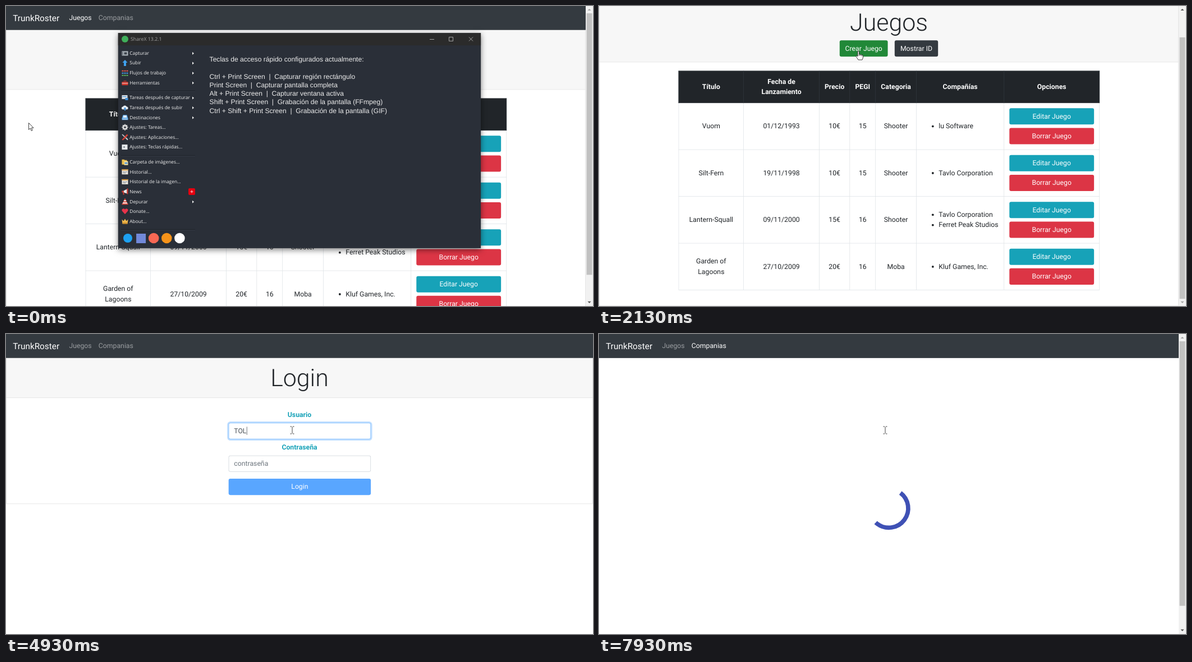
An HTML page with a canvas for the animation above (8 s loop, 1046 by 535 pixels).

```html
<!DOCTYPE html>
<html lang="es">
<head>
<meta charset="utf-8">
<title>Juegos</title>
<style>
  html, body { margin: 0; width: 100%; height: 100%; overflow: hidden; background: #fff; }
  canvas { display: block; }
</style>
</head>
<body>
<canvas id="stage" width="1046" height="535"></canvas>
<script>
const ctx = document.getElementById('stage').getContext('2d');
// pages are laid out for a 1366 px wide screen and scaled to the stage
const LOOP = 8000, W = 1366, H = 699, SCALE = 1046 / W, BAR = 17, BODY = W - BAR, MAX_SCROLL = 64;
const ROBOTO = 'Roboto, sans-serif', MENU = '"Open Sans", sans-serif', ARIAL = '"Liberation Sans", Arial, sans-serif';
const INK = '#212529', EDGE = '#dfdfdf', RULE = '#dee2e6', DARK_RULE = '#32383e';

const clamp = v => Math.max(0, Math.min(1, v));
const smooth = v => { v = clamp(v); return v * v * (3 - 2 * v); };
const last = (list, t) => list.filter(e => e[0] <= t).pop();

// ---------- drawing helpers ----------
function rect(x, y, w, h, color) {
  ctx.fillStyle = color;
  ctx.fillRect(x, y, w, h);
}

function round(x, y, w, h, r, color) {
  ctx.fillStyle = color;
  ctx.beginPath();
  ctx.roundRect(x, y, w, h, r);
  ctx.fill();
}

function disc(x, y, r, color) {
  ctx.fillStyle = color;
  ctx.beginPath();
  ctx.arc(x, y, r, 0, 7);
  ctx.fill();
}

function shape(d, x, y, fill, stroke) {
  const p = new Path2D(d);
  ctx.save();
  ctx.translate(x, y);
  if (fill) { ctx.fillStyle = fill; ctx.fill(p); }
  if (stroke) { ctx.strokeStyle = stroke; ctx.lineWidth = 0.8; ctx.stroke(p); }
  ctx.restore();
}

// y is the middle of the line box
function text(str, x, y, color = INK, { size = 16, weight = 400, align = 'left', family = ROBOTO } = {}) {
  ctx.font = `${weight} ${size}px ${family}`;
  ctx.textAlign = align;
  ctx.fillStyle = color;
  ctx.fillText(str, x, Math.round(y + size * 0.342));
}
const centered = (str, x, y, color, opt) => text(str, x, y, color, { align: 'center', ...opt });

function button(label, x, y, w, color) {
  round(x, y, w, 38, 4, color);
  centered(label, x + w / 2, y + 18.8, '#fff');
}

// ---------- shared page parts ----------
function navbar(active, width) {
  rect(0, 0, width, 56, '#343a40');
  text('TrunkRoster', 16, 28, '#fff', { size: 20 });
  ['Juegos', 'Companias'].forEach((name, i) =>
    text(name, i ? 215.3 : 146.8, 27.5, i === active ? '#fff' : '#9a9da0'));
}

function card(title, width, headEnd, bottom) {
  rect(0, 56, width, headEnd - 56, '#f7f7f7');
  rect(0, headEnd, width, 1, EDGE);
  rect(0, 56, 1, bottom - 56, EDGE);
  rect(width - 1, 56, 1, bottom - 56, EDGE);
  rect(1, bottom, width - 2, 1, EDGE);
  centered(title, width / 2, 102.6, INK, { size: 56, weight: 300 });
}

function scrollbar(pos, length) {
  rect(BODY, 0, BAR, H, '#f1f1f1');
  rect(BODY + 2, BAR + pos * (H - 2 * BAR - length), 13, length, '#c1c1c1');
  shape('M-4 2H4L0 -2z', BODY + 8.5, 8.5, pos > 0 ? '#505050' : '#a3a3a3');
  shape('M-4 -2H4L0 2z', BODY + 8.5, 690, pos < 1 ? '#505050' : '#a3a3a3');
}

// ---------- games page ----------
const COLS = [185, 336, 512, 583, 643, 738, 942, 1164];
const HEADS = ['Título', 'Fecha de|Lanzamiento', 'Precio', 'PEGI', 'Categoria', 'Compañías', 'Opciones'];
const GAMES = [
  ['Vuom', '01/12/1993', '10€', '15', 'Shooter', 'lu Software'],
  ['Silt-Fern', '19/11/1998', '10€', '15', 'Shooter', 'Tavlo Corporation'],
  ['Lantern-Squall', '09/11/2000', '15€', '16', 'Shooter', 'Tavlo Corporation|Ferret Peak Studios'],
  ['Garden of|Lagoons', '27/10/2009', '20€', '16', 'Moba', 'Kluf Games, Inc.']
];
const middle = i => (COLS[i] + COLS[i + 1] + 1) / 2;

function lines(str, y, draw) {
  const parts = str.split('|');
  parts.forEach((p, i) => draw(p, y + (i - (parts.length - 1) / 2) * 24));
}

function table() {
  const top = 215, first = 289, pitch = 109, left = COLS[0], width = COLS[7] + 1 - left;
  for (const x of COLS) rect(x, first, 1, pitch * GAMES.length, RULE);
  rect(left, top, width, 75, INK);
  for (const x of COLS) rect(x, top, 1, 75, DARK_RULE);
  for (const y of [top, first]) rect(left, y, width, 1, DARK_RULE);
  HEADS.forEach((h, i) => lines(h, 252, (s, y) => centered(s, middle(i), y, '#fff', { weight: 700 })));

  GAMES.forEach((game, r) => {
    const y = first + r * pitch;
    rect(left, y + pitch, width, 1, RULE);
    game.forEach((cell, i) => lines(cell, y + 54.5, (s, ly) => {
      if (i < 5) return centered(s, middle(i), ly);
      disc(776.8, ly + 0.7, 2.5, INK);
      text(s, 790.5, ly);
    }));
    button('Editar Juego', 955, y + 13, 197, '#17a2b8');
    button('Borrar Juego', 955, y + 59, 197, '#dc3545');
  });
}

function gamesPage(t) {
  const s = Math.round(MAX_SCROLL * smooth((t - 1568) / 250));
  ctx.save();
  ctx.translate(0, -s);
  navbar(0, BODY);
  card('Juegos', BODY, 194, 762);
  const press = clamp((t - 2560) / 100), d = 3.2 * press;
  if (press) round(560 - d, 144 - d, 112 + 2 * d, 38 + 2 * d, 4 + d, 'rgba(40,167,69,.5)');
  button('Crear Juego', 560, 144, 112, press ? '#1e7e34' : t < 1470 ? '#28a745' : '#218838');
  button('Mostrar ID', 688, 144, 101, '#343a40');
  table();
  ctx.restore();
  scrollbar(s / MAX_SCROLL, 609);
}

// ---------- desktop window, in stage pixels ----------
const ICONS = {
  photo: ['#aeb6bc', 'M0 2h11v8H0z', '#3c434b', 'M1 3h1v6H1zM4 4h5v4H4z'],
  up: ['#3fa2f0', 'M5.5 0L10 5H7.5v6h-4V5H1z'],
  grid: ['#e4574c', 'M0 1h3v2H0zM4 1h3v2H4zM8 1h3v2H8z', '#4a9be8', 'M0 5h3v2H0zM4 5h3v2H4zM8 5h3v2H8z',
    '#5cb85c', 'M0 9h3v2H0zM4 9h3v2H4zM8 9h3v2H8z'],
  box: ['#d5392f', 'M0 4h11v6H0zM3 2h5v1H3z', '#f0d9d6', 'M0 6h11v1H0z'],
  task: ['#d8dee4', 'M0 1h10v7H0z', '#3f8fd8', 'M1 3h7v1H1zM6 6h5v4H6z'],
  cloud: ['#e8edf2', 'M2 9a2.5 2.5 0 0 1 0-5a3.5 3.5 0 0 1 6.5 0a2.5 2.5 0 0 1 0 5z', '#3f8fd8', 'M5.5 5l2.5 3H6.5v3h-2V8H3z'],
  drive: ['#5aa5e6', 'M2 1h7l2 6v3H0V7z', '#e3eef8', 'M3 2h5l1 4H2zM1 8h9v1H1z'],
  gear: ['#dcdcdc', 'M4.5 0h2v2l2-1 1.5 1.5-1 2h2v2H9l1 2L8.5 10l-2-1v2h-2V9l-2 1L1 8.5l1-2H0v-2h2l-1-2L2.5 1l2 1z', '#2a2f38', 'M4 4h3v3H4z'],
  tools: ['#c9ced3', 'M0 1l1-1 10 9-1 2z', '#d84338', 'M9 0l2 2-9 9-2-1z'],
  page: ['#e6e9ec', 'M0 1h10v9H0z', '#6d7780', 'M3 4h2v3H3z'],
  folder: ['#e9bd4d', 'M0 1h4l1 1h4v8H0z', '#f7e2a0', 'M4 4h7v7H4z', '#5a9bd8', 'M5 6h5v3H5z'],
  list: ['#e8e5de', 'M0 1h11v9H0z', '#d99a3c', 'M0 1h11v2H0z', '#78828c', 'M2 5h3v1H2zM6 5h3v1H6zM2 7h5v1H2z'],
  horn: ['#e9e9e9', 'M3 4l6-3v8L3 7z', '#d63b30', 'M0 4h3v3H0zM9 0h2v10H9zM2 7h2v4H2z'],
  cone: ['#e2473a', 'M5 0h1l4 9h1v2H0V9h1z', '#f3f3f3', 'M4 3h3l1 2H3zM2 7h7l1 2H1z'],
  heart: ['#e8334a', 'M5.5 10.5L.5 5A2.8 2.8 0 0 1 5.5 2A2.8 2.8 0 0 1 10.5 5z'],
  crown: ['#f0b84a', 'M0 2l3 3 2.5-4L8 5l3-3-1 8H1z', '#c98a2a', 'M1 8h9v2H1z']
};
// label, icon, submenu arrow; null is a separator
const ITEMS = [
  ['Capturar', 'photo', 1], ['Subir', 'up', 1], ['Flujos de trabajo', 'grid', 1], ['Herramientas', 'box', 1], null,
  ['Tareas después de capturar', 'task', 1], ['Tareas después de subir', 'cloud', 1], ['Destinaciones', 'drive', 1],
  ['Ajustes: Tareas...', 'gear'], ['Ajustes: Aplicaciones...', 'tools'], ['Ajustes: Teclas rápidas...', 'page'], null,
  ['Carpeta de imágenes...', 'folder'], ['Historial...', 'list'], ['Historial de la imagen...', 'list'], ['News', 'horn'],
  ['Depurar', 'cone', 1], ['Donate...', 'heart'], ['About...', 'crown'], null
];
const HOTKEYS = [
  'Teclas de acceso rápido configurados actualmente:', '',
  'Ctrl + Print Screen  |  Capturar región rectángulo',
  'Print Screen  |  Capturar pantalla completa',
  'Alt + Print Screen  |  Capturar ventana activa',
  'Shift + Print Screen  |  Grabación de la pantalla (FFmpeg)',
  'Ctrl + Shift + Print Screen  |  Grabación de la pantalla (GIF)'
];

function toolWindow() {
  ctx.save();
  ctx.shadowColor = 'rgba(0,0,0,.5)';
  ctx.shadowBlur = 10;
  ctx.shadowOffsetY = 3;
  rect(199.8, 48.2, 646.3, 383.7, '#2a2f38');
  ctx.restore();
  rect(199.8, 48.2, 646.3, 22, '#2b2b2b');
  disc(212, 59, 6, '#3fae5a');
  text('ShareX 13.2.1', 222, 59.3, '#a2a2a2', { size: 8.8, family: MENU });
  shape('M755 59.5h8M789.5 55.5h7v7h-7zM825 55.5l7 7M832 55.5l-7 7', 0, 0, null, '#c4c4c4');

  let y = 84;
  for (const item of ITEMS) {
    if (!item) {
      rect(205, Math.round(y - 3.5), 132, 1, '#1d2127');
      rect(205, Math.round(y - 2.5), 132, 1, '#343a44');
      y += 9;
      continue;
    }
    const [label, icon, sub] = item, art = ICONS[icon];
    for (let i = 0; i < art.length; i += 2) shape(art[i + 1], 206.5, y - 5.5, art[i]);
    text(label, 220.3, y, '#f0f0f0', { size: 8.4, family: MENU });
    if (sub) shape('M0 -2.5L3 0L0 2.5z', 332, y + 0.5, '#f0f0f0');
    if (label === 'News') {
      round(325, y - 6, 12, 12, 2, '#e5000f');
      shape('M331 -2.5v5M328.5 0h5', 0, y, null, '#fff');
    }
    y += 17.62;
  }
  ['#1da1f2', '#7289da', '#f96854', '#f7931a', '#ffffff'].forEach((c, i) => {
    const x = 217 + i * 23.1;
    if (i === 1) rect(x - 8, 406, 17, 17, c);
    else disc(x, 414, i ? 9.3 : 8, c);
  });
  HOTKEYS.forEach((s, i) => text(s, 362.6, 94.8 + i * 15.3, '#ececec', { size: 12.1, family: ARIAL }));
}

// ---------- login page ----------
const FOCUS_USER = 3530, FOCUS_PASS = 6200;
const USER = [[0, ''], [FOCUS_USER, ''], [4200, 'T'], [4330, 'TO'], [4470, 'TOL'], [4670, 'TOLV'], [4930, 'TOL'],
  [5070, 'TO'], [5130, 'T'], [5200, ''], [5400, 't'], [5470, 'to'], [5600, 'tol'], [5670, 'tolv'],
  [5800, 'tolva'], [5870, 'tolvan'], [5930, 'tolvand'], [6000, 'tolvando']];
const PASS = [[0, ''], [FOCUS_PASS, ''], [6670, '•'], [6800, '••'], [7000, '•••'], [7270, '••••']];

function field(y, keys, hint, glow, focused, t) {
  const [since, value] = last(keys, t), x = 518, w = 331, d = 3.2 * glow;
  if (glow) round(x - d, y - d, w + 2 * d, 38 + 2 * d, 4 + d, '#bfdeff');
  round(x, y, w, 38, 4, glow > 0.3 ? '#80bdff' : '#ced4da');
  round(x + 1, y + 1, w - 2, 36, 3, '#fff');
  text(value || hint, x + 12.6, y + 18.8, value ? '#495057' : '#6c757d');
  if (focused && Math.floor((t - since) / 530) % 2 === 0) {
    const end = value ? ctx.measureText(value).width : 0;
    rect(Math.round(x + 12.6 + end), y + 9, 1, 19, '#495057');
  }
}

function loginPage(t) {
  navbar(-1, W);
  card('Login', W, 148, 395);
  centered('Usuario', 683, 187.5, '#17a2b8', { weight: 700 });
  centered('Contraseña', 683, 263.5, '#17a2b8', { weight: 700 });
  const glowIn = clamp((t - FOCUS_USER + 30) / 150), swap = clamp((t - FOCUS_PASS + 30) / 150);
  field(207, USER, 'usuario', glowIn * (1 - swap), t >= FOCUS_USER && t < FOCUS_PASS, t);
  field(283, PASS, 'contraseña', swap, t >= FOCUS_PASS, t);
  button('Login', 518, 337, 331, last(PASS, t)[1] ? '#007bff' : '#59a6ff');
}

// ---------- loading page ----------
function bezierEase(x) {
  let lo = 0, hi = 1, s;
  for (let i = 0; i < 20; i++) {
    s = (lo + hi) / 2;
    const bx = 1.05 * (1 - s) ** 2 * s + 0.75 * (1 - s) * s * s + s ** 3;
    if (bx < x) lo = s; else hi = s;
  }
  return s * s * (3 - 2 * s);
}

function loadingPage(t) {
  navbar(1, BODY);
  scrollbar(0, 616);
  const age = t - 7725, start = (age / 2000 - 0.25) * 2 * Math.PI;
  ctx.strokeStyle = '#3f51b5';
  ctx.lineWidth = 10;
  ctx.beginPath();
  ctx.arc(674.5, 406, 45, start, start + 2 * Math.PI * (0.05 + 0.75 * bezierEase(clamp(age / 500))));
  ctx.stroke();
}

// ---------- pointer, in stage pixels ----------
const PATH = [[0, 40, 208], [130, 37, 188], [800, 37, 188], [1070, 397, 163], [1270, 397, 163], [1530, 470, 134],
  [1800, 470, 134], [2130, 462, 80], [3000, 462, 80], [3400, 510, 170], [3530, 510, 172], [LOOP, 510, 172]];

function pointer(t) {
  const i = PATH.findIndex(p => p[0] > t), [t0, x0, y0] = PATH[i - 1], [t1, x1, y1] = PATH[i];
  const k = (t - t0) / (t1 - t0), x = Math.round(x0 + (x1 - x0) * k), y = Math.round(y0 + (y1 - y0) * k);
  if (t > 2900 && y >= 158) {
    shape('M-3 -6.5h2.5M1.5 -6.5H4M.5 -6v12M-3 6.5h2.5M1.5 6.5H4', x - 0.5, y - 0.5, null, '#111');
  } else if (t >= 1470 && t < 2930) {
    shape('M-1 1Q0 -.5 1.5 1V6.5Q3 5 4 7Q5.5 6 6.5 7.5Q8 7 8.5 8.5V12L7 16H0L-3.5 10.5Q-4.5 8.5 -2.5 8.5L-1 10z', x, y, '#fff', '#111');
    shape('M1.5 6v3M4 7v2M6.5 7.5v2', x, y, null, '#111');
  } else {
    shape('M.5 .5V12.5L3.3 10L5.2 14.5L7.2 13.6L5.3 9.3H9z', x, y, '#fff', '#111');
  }
}

// ---------- timeline ----------
function draw(t) {
  ctx.textRendering = 'geometricPrecision';
  ctx.save();
  ctx.scale(SCALE, SCALE);
  rect(0, 0, W, H, '#fff');
  if (t < 2870) gamesPage(t);
  else if (t < 7730) loginPage(t);
  else loadingPage(t);
  ctx.restore();
  if (t < 530) toolWindow();
  pointer(t);
}

const tick = k => Math.round(k * 20 / 3) * 10;

function frame() {
  const t = performance.now() % LOOP;
  let k = Math.floor(t * 0.015 + 0.1);
  if (tick(k) > t) k--;
  draw(tick(k));
  requestAnimationFrame(frame);
}
frame();
</script>
</body>
</html>
```
